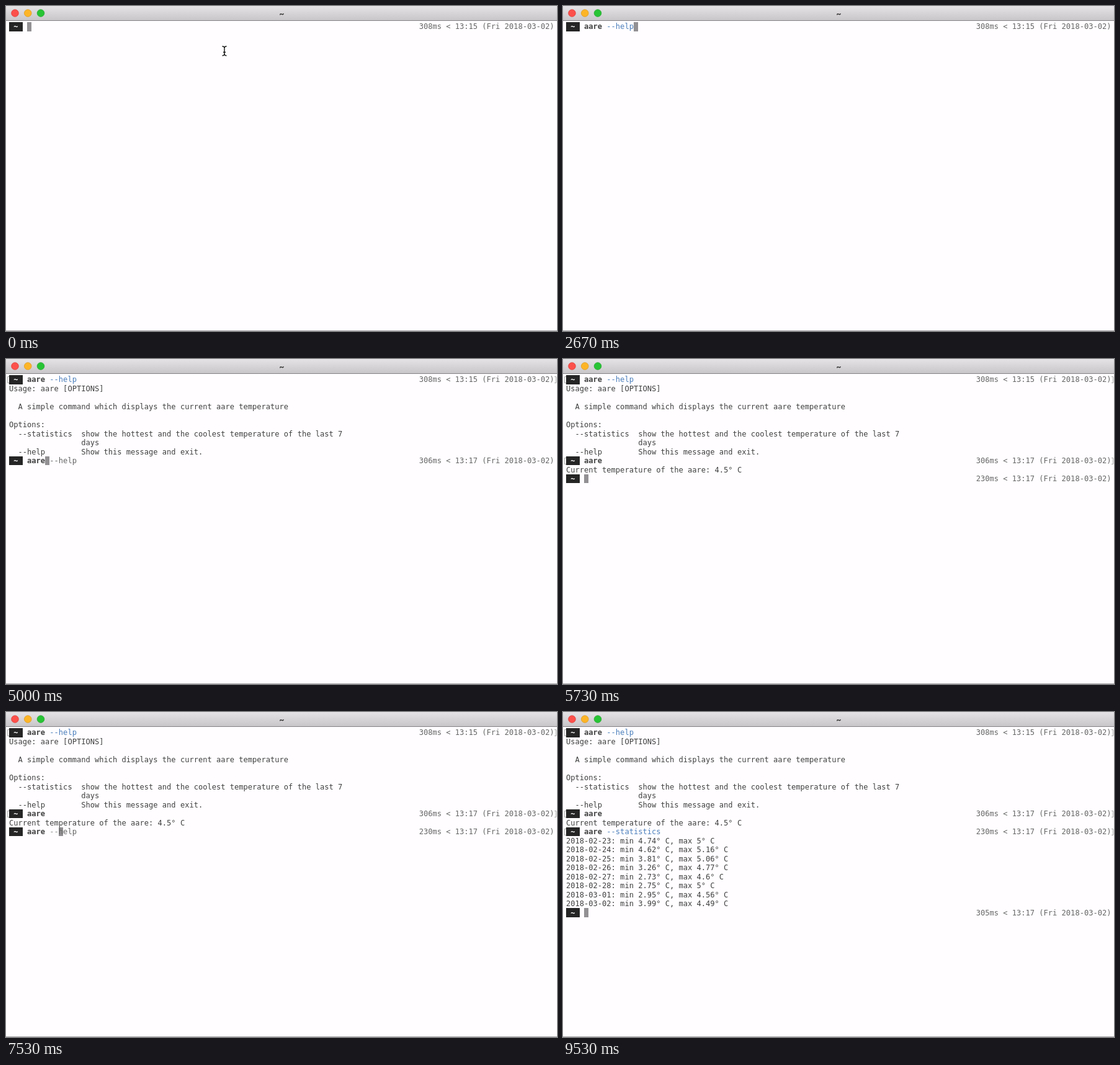
An HTML page with a canvas for the animation above (9590 ms loop, 888x524 px).

```html
<!DOCTYPE html>
<html lang="en">
<head>
<meta charset="utf-8">
<title>Terminal</title>
<style>
html, body { margin: 0; width: 888px; height: 524px; overflow: hidden; background: #fffdff; }
canvas { display: block; }
</style>
</head>
<body>
<canvas id="stage" width="888" height="524"></canvas>
<script>
const ctx = document.getElementById('stage').getContext('2d');
const LOOP = 9590, CELL = 7.26, LINE = 14.52, LEFT = 5, TOP = 26;
const INK = '#404040', DIM = '#666', RED = '#db352d', BLUE = '#4a7ebb', CURSOR = '#929092';
const MONO = '"DejaVu Sans Mono", monospace';

// Each prompt: key times, when Enter is pressed, when the output arrives.
const prompts = [
  { row: 0, start: 0, info: '308ms < 13:15', text: 'aare --help',
    keys: [730, 930, 1070, 1270, 1400, 1600, 1730, 2000, 2130, 2270, 2400],
    hint: n => n < 8 ? 'aare --statistics' : 'aare --help',
    enter: 2870, done: 3200,
    output: ['Usage: aare [OPTIONS]', '',
      '  A simple command which displays the current aare temperature', '', 'Options:',
      '  --statistics  show the hottest and the coolest temperature of the last 7',
      '                days', '  --help        Show this message and exit.'] },
  { row: 9, start: 3200, info: '306ms < 13:17', text: 'aare',
    keys: [4270, 4400, 4530, 4670], hint: () => 'aare --help',
    enter: 5070, done: 5300, output: ['Current temperature of the aare: 4.5° C'] },
  { row: 11, start: 5300, info: '230ms < 13:17', text: 'aare --statistics',
    keys: [6130, 6270, 6400, 6530, 6730, 6930, 7070,
      7600, 7670, 7730, 7800, 7870, 7930, 8000, 8070, 8130, 8200],
    hint: n => n < 5 ? 'aare' : n < 8 ? 'aare --help' : 'aare --statistics',
    enter: 8470, done: 8800,
    output: ['02-23: min 4.74° C, max 5° C', '02-24: min 4.62° C, max 5.16° C',
      '02-25: min 3.81° C, max 5.06° C', '02-26: min 3.26° C, max 4.77° C',
      '02-27: min 2.73° C, max 4.6° C', '02-28: min 2.75° C, max 5° C',
      '03-01: min 2.95° C, max 4.56° C', '03-02: min 3.99° C, max 4.49° C'].map(s => '2018-' + s) },
  { row: 20, start: 8800, info: '305ms < 13:17', text: '', keys: [], hint: () => '',
    enter: Infinity, done: Infinity, output: [] }
];

const colX = col => LEFT + col * CELL;
const rowY = row => TOP + row * LINE;

function rect(x, y, w, h, color) {
  ctx.fillStyle = color;
  ctx.fillRect(x, y, w, h);
}

function block(col, row, cells, color) {
  const x = Math.round(colX(col)), y = Math.round(rowY(row));
  rect(x, y, Math.round(colX(col + cells)) - x, Math.round(rowY(row + 1)) - y, color);
}

function write(text, col, row, color = INK, weight = 400) {
  ctx.font = `${weight} 12px ${MONO}`;
  ctx.fillStyle = color;
  [...text].forEach((ch, i) => ctx.fillText(ch, colX(col + i), rowY(row) + 11.4));
}

function bracket(x, dir, row) {
  const y = Math.round(rowY(row)) + 2.5;
  ctx.strokeStyle = '#aaa';
  ctx.lineWidth = 1;
  ctx.beginPath();
  ctx.moveTo(x + 2.5 * dir, y);
  ctx.lineTo(x, y);
  ctx.lineTo(x, y + 10);
  ctx.lineTo(x + 2.5 * dir, y + 10);
  ctx.stroke();
}

function drawPrompt(p, t) {
  const n = p.keys.filter(k => k <= t).length;
  const typed = p.text.slice(0, n), entered = t >= p.enter;
  block(0, p.row, 3, '#262526');
  write('~', 1, p.row, '#fff', 700);
  write(p.info + ' (Fri 2018-03-02)', 91, p.row, DIM);

  if (!entered) block(4 + n, p.row, 1, CURSOR);
  else if (t < p.done) block(0, p.row + 1, 1, CURSOR);

  const valid = n > 3;
  write(typed.slice(0, 4), 4, p.row, valid ? INK : RED, valid ? 700 : 400);
  write(typed.slice(4), 8, p.row, n > 7 ? BLUE : '#8c8c8c');
  if (n && !entered) write(p.hint(n).slice(n), 4 + n, p.row, DIM);

  if (entered) {
    bracket(2.5, 1, p.row);
    bracket(886.5, -1, p.row);
  }
  if (t >= p.done) p.output.forEach((line, i) => write(line, 0, p.row + 1 + i));
}

function drawWindow() {
  rect(0, 0, 888, 524, '#fffdff');
  const bar = ctx.createLinearGradient(0, 0, 0, 23);
  bar.addColorStop(0, '#e6e3e6');
  bar.addColorStop(1, '#c9c6c9');
  rect(0, 0, 888, 23, bar);
  rect(0, 23, 888, 1, '#858285');
  rect(0, 523, 888, 1, '#a5a3a5');
  [['#fc504b', '#df3d38'], ['#fdb527', '#dd9a1c'], ['#28c435', '#1fa62b']].forEach(([fill, edge], i) => {
    ctx.beginPath();
    ctx.arc(14.5 + i * 20.75, 11.5, 5.8, 0, 7);
    ctx.fillStyle = fill;
    ctx.fill();
    ctx.strokeStyle = edge;
    ctx.lineWidth = 0.8;
    ctx.stroke();
  });
  ctx.font = '600 13px Inter, sans-serif';
  ctx.fillStyle = '#333';
  ctx.textAlign = 'center';
  ctx.fillText('~', 444.3, 17);
  ctx.textAlign = 'left';
}

function drawPointer() {
  const beam = new Path2D('M348.5 65Q352 65 352 68V77Q352 80 348.5 80M355.5 65Q352 65 352 68M352 77Q352 80 355.5 80M350 74.5H354');
  for (const [color, width] of [['#fff', 3], ['#111', 1.4]]) {
    ctx.strokeStyle = color;
    ctx.lineWidth = width;
    ctx.stroke(beam);
  }
}

function frame() {
  const t = performance.now() % LOOP;
  drawWindow();
  if (t < prompts[0].keys[0]) drawPointer();
  for (const p of prompts) if (t >= p.start) drawPrompt(p, t);
  requestAnimationFrame(frame);
}
frame();
</script>
</body>
</html>
```
